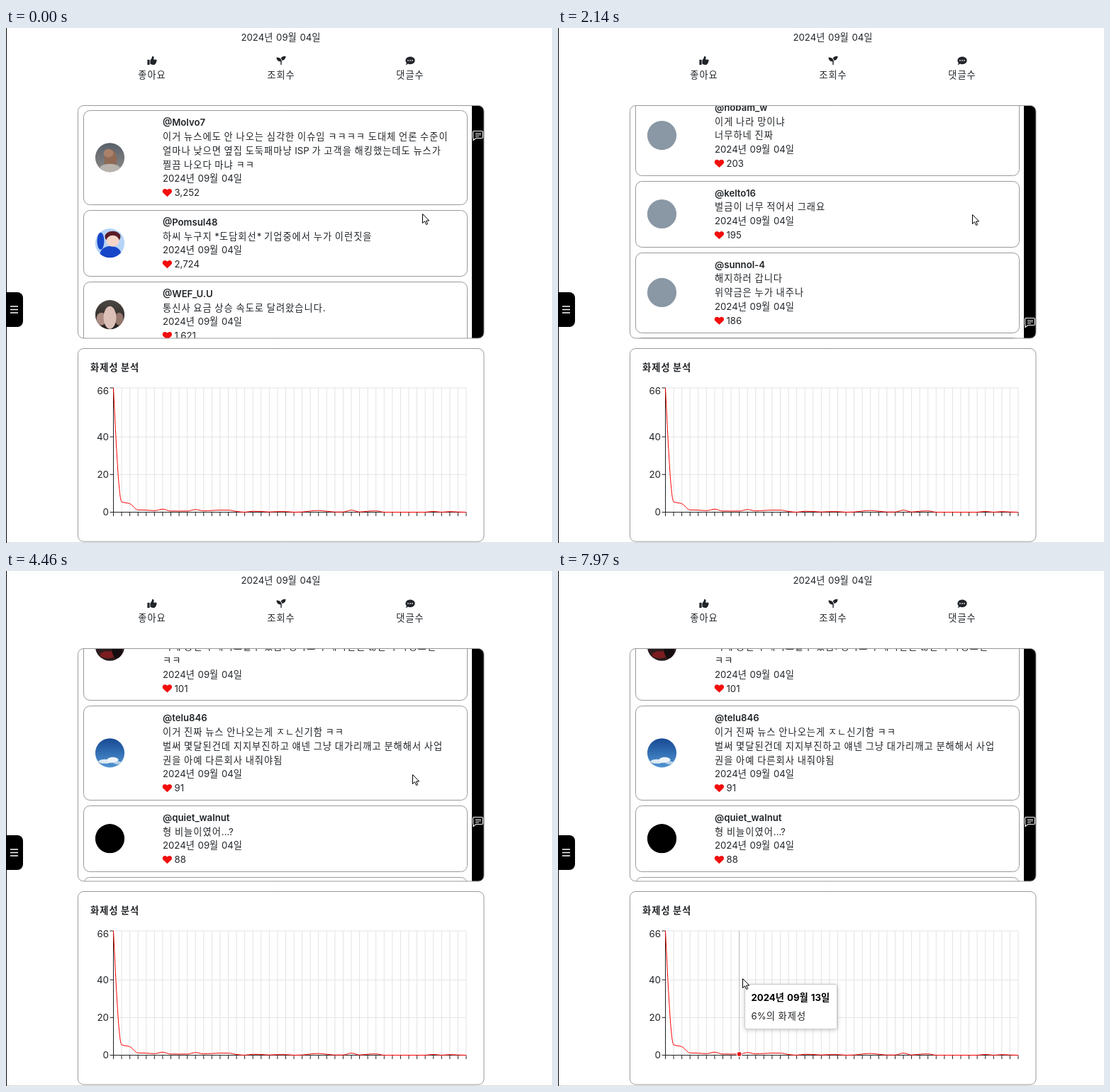
An HTML page with a canvas that plays this animation: 770 px wide and 727 px high, repeating every 8000 ms.

```html
<!DOCTYPE html>
<html lang="ko">
<head>
<meta charset="utf-8">
<title>댓글과 화제성 분석</title>
<style>
html, body { margin: 0; width: 100%; height: 100%; overflow: hidden; background: #fff; }
canvas { display: block; width: 770px; height: 727px; }
</style>
</head>
<body>
<canvas id="stage" width="770" height="727"></canvas>
<script>
const ctx = document.getElementById('stage').getContext('2d');
const LOOP = 8000, TICK = 70, INK = '#212529', EDGE = '#999';
const LINE = 19.83, PAD = 14.7, GAP = 7;
const VIEW = { top: 109, height: 329 };
const DATE = '2024년 09월 04일';

// Each comment: name, likes, avatar, lines of text.
// Avatar: background (one colour or two for a gradient), letter, blobs of [colour, x, y, rx, ry].
const plain = { bg: ['#8a97a5'] };
const comments = [
  ['@Molvo7', '3,252', { bg: ['#59616a', '#8b8886'], blobs: [['#8f6a55', 1, 3, 9, 14], ['#b9b3ae', 0, 15, 14, 6], ['#a98069', -2, -6, 7, 6]] },
    '이거 뉴스에도 안 나오는 심각한 이슈임 ㅋㅋㅋㅋ 도대체 언론 수준이', '얼마나 낮으면 옆집 도둑패마냥 ISP 가 고객을 해킹했는데도 뉴스가', '찔끔 나오다 마냐 ㅋㅋ'],
  ['@Pomsul48', '2,724', { bg: ['#b5d3f7'], blobs: [['#1747c8', 1, 16, 15, 12], ['#1747c8', -13, -3, 5, 12], ['#5a1c28', 4, -9, 11, 8], ['#f6d6c8', 4, -3, 9, 8]] },
    '하씨 누구지 *도담회선* 기업중에서 누가 이런짓을'],
  ['@WEF_U.U', '1,621', { bg: ['#4a4642', '#25211f'], blobs: [['#ae8d84', -12, 6, 7, 9], ['#96776e', 13, 6, 6, 9], ['#dbc0b7', 0, 4, 9, 16]] },
    '통신사 요금 상승 속도로 달려왔습니다.'],
  ['@sorim30', '1,498', plain, '이런 영상은 더 많은 사람들이 봐야 합니다', '설명이 정말 쉽네요'],
  ['@bulto_k', '1,204', plain, '보안에 돈을 안 쓰니까 이런 일이 생기지', '매번 똑같은 사과문'],
  ['@nanol55', '987', plain, '이걸 이제서야 알았네요'],
  ['@perun-q', '842', plain, '요금은 매년 올리면서', '고객 보호는 뒷전이네'],
  ['@dalsik09', '711', { bg: ['#2f86e8'], blobs: [['#050505', 0, 5, 14, 22]] },
    '통신사가 이러면 안되지', '요금은 제일 비싸게 받으면서', '고객은 뒷전이고', '사과도 없이 넘어가고', '그돈으로 보안만 챙겼어도 이지경까지안왔음( 구석이나 코인거래소', '보면 보안완벽한곳은 안털림)', '정부가 나서서 소비자보호해줄때임'],
  ['@TubbNoory', '475', { bg: ['#fff'], blobs: [['#c9c9c9', 0, 17, 13, 8], ['#242424', 0, -7, 10, 10], ['#c9987c', 0, -1, 8, 10]] },
    '3:37 노벤 어디 달려있는거얔ㅋㅋㅋㅋ'],
  ['@qqv-k7e', '429', { bg: ['#01579b'], letter: 'Q' },
    '3:59 힘으로 안되는 게 있다면 힘이 부족한 게 아닌지 다시 생각해 보', '아요'],
  ['@mirae_v', '402', plain, '회사가 커도 보안은 작네', '다들 조심하세요'],
  ['@torok81', '366', plain, '인터넷이 느린 이유가 있었네', '속도 측정 해봐야겠다', '어쩐지 밤마다 끊기더라'],
  ['@fennu-2', '331', plain, '정리 감사합니다', '다음 영상도 기대됩니다'],
  ['@rollin7', '299', { bg: ['#eee6df'], blobs: [['#d9a27c', -8, 8, 8, 9], ['#efe9e4', 5, 3, 8, 9], ['#c23b2d', 0, 14, 10, 4]] }, '댓글이 더 재밌네'],
  ['@plomder', '255', { bg: ['#7b1fa2'], letter: '나' },
    '모래섬 초대받아서 노을다락방 라이브 보고싶은 새벽자판이면 개추', 'ㅋㅋ'],
  ['@marshlight7056', '233', { bg: ['#0d0a0a'], blobs: [['#b98358', 0, -5, 10, 11], ['#e2c198', 0, 8, 10, 10], ['#d8ab7a', -5, -12, 4, 4]] },
    'vo마루빛결도 토렌트 받을 때 70KB/s도 안나오던데.. 10.0.0.1만 켜도', '10MB/s 정도로 확 높아짐...이거 조사해야함 ㄹㅇ'],
  ['@guest-ovrixwn', '214', plain, '한국 통신3사가 "대한민국"의 요약본인 그냥ㅡㅡㅡ', '답이 없다'],
  ['@hobam_w', '203', plain, '이게 나라 망이냐', '너무하네 진짜'],
  ['@kelto16', '195', plain, '벌금이 너무 적어서 그래요'],
  ['@sunnol-4', '186', plain, '해지하러 갑니다', '위약금은 누가 내주나'],
  ['@ksrttmz8237', '160', { bg: ['#c64f52'], blobs: [['#a93f43', 0, 16, 15, 10], ['#c64f52', 0, 18, 15, 10]] },
    '1:31 새벽자판은 솔방울콩과 두리 방송을 즐겨본다'],
  ['@hww-da3ol', '156', { bg: ['#5d4037'], letter: 'h' },
    '새벽자판님 아무리 조회수가 급해도 그렇지', '국가 기반산업인 통신을 업으로 삼는 기업이', '이런 짓을 할 리가 없지 않읍니까!', '예?! 이게 진짜면 통신사가 스팸메신저 보내라고', '개인정보 팔아넘긴 괴담도 진짜겠네! 허 참나!'],
  ['@나무결소리봄', '148', plain, '뉴스에 안 나오는 이유가 있겠지', '광고주니까'],
  ['@vando_3', '139', plain, '파일 하나 받는데 하루 걸림', '이제 이해가 되네'],
  ['@oritae5', '131', plain, '소송 가면 이길 수 있나요', '궁금합니다'],
  ['@limpo-x', '122', plain, '요즘 세상에 이런 일이', '믿기지가 않네요'],
  ['@ssudam', '117', plain, '영상 잘 봤습니다', '공유할게요'],
  ['@gorae_n', '109', plain, '빨리 조사해라', '기다리고 있다'],
  ['@dokkom2', '101', { bg: ['#2c1d1f'], blobs: [['#7c1c1e', -3, 12, 11, 5], ['#140c0e', 10, 5, 7, 12]] },
    '전화해서 물어보니 모른다고 함', '상담원도 처음 듣는다는데', '되레 통신사 해지도할수 있음! 생각보다 해지인원 많은거 다행스런', 'ㅋㅋ'],
  ['@telu846', '91', { bg: ['#174a94', '#4f94d2'], blobs: [['#dfe9f3', -7, 12, 9, 3], ['#eef4fa', 4, 10, 8, 4], ['#b9d2ea', 12, 14, 7, 2]] },
    '이거 진짜 뉴스 안나오는게 ㅈㄴ신기함 ㅋㅋ', '벌써 몇달된건데 지지부진하고 얘넨 그냥 대가리깨고 분해해서 사업', '권을 아예 다른회사 내줘야됨'],
  ['@quiet_walnut', '88', { bg: ['#000'] }, '형 비늘이였어...?'],
  ['@numal70', '85', plain, '잘 보고 갑니다']
].map(([name, likes, avatar, ...lines]) =>
  ({ name, likes, avatar, lines, h: (lines.length + 3) * LINE + PAD }));

let total = 0;
for (const c of comments) { c.top = total; total += c.h + GAP; }

// Scroll that puts comment i at height y, and page height that puts the thumb at iconY.
const at = (i, y) => comments[i].top + 116 - y;
const fit = (s, iconY) => (s + VIEW.height / 2) * VIEW.height / (iconY - VIEW.top);
const sA = at(8, 212.5), sB = at(14, 162), sC = at(20, 133), sD = at(29, 190);
const pages = [[0, fit(sA, 393)], [865, fit(sB, 358)], [2200, fit(sC, 335)], [3500, fit(sD, 353.5)]];

const linear = k => k;
const easeIn = k => k * k;
const easeOut = k => 1 - (1 - k) ** 2;
const easeBoth = k => k * k * (3 - 2 * k);

// Keys: time, value, easing of the way to that value.
const scrollKeys = [
  [0, 0], [760, sA, easeBoth], [830, sA + 3], [1110, sA + 430, easeBoth],
  [1390, sA + 430], [1600, sB, easeIn], [2140, pages[1][1] - VIEW.height, easeOut],
  [2200, pages[1][1] - VIEW.height], [2480, sC - 40, easeBoth], [2610, sC - 40], [2680, sC],
  [2820, sC + 280, easeOut], [2900, sC + 280], [3180, sC + 880, easeBoth],
  [3510, sC + 880], [3930, sD, easeBoth]
];
const mouseKeys = [
  [60, [587.5, 262]], [690, [584.5, 263.5]], [4390, [584.5, 263.5]], [4460, [573.5, 287.5]],
  [4810, [490, 515]], [5090, [390, 570]], [5240, [174, 572]], [5450, [171, 568]],
  [5590, [160, 572]], [5660, [159.5, 580]], [6010, [159, 577]], [6080, [147.5, 574]],
  [6220, [147.5, 576]], [6290, [160, 576]], [6920, [163, 574]], [6990, [171, 572]],
  [7340, [192, 570]], [7760, [252, 573]], [7970, [260.5, 575]]
];

// The screen moves in short held steps, counted from each key.
function track(keys, t) {
  const n = keys.findIndex(k => k[0] > t);
  if (n === 0) return keys[0][1];
  if (n < 0) return keys[keys.length - 1][1];
  const [t0, a] = keys[n - 1], [t1, b, ease = linear] = keys[n];
  const k = ease(Math.floor((t - t0) / TICK) * TICK / (t1 - t0));
  return Array.isArray(a) ? a.map((v, i) => v + (b[i] - v) * k) : a + (b - a) * k;
}

// Hangul takes a full em per syllable.
function text(s, x, y, { size = 13.2, weight = 400, color = INK, align = 0 } = {}) {
  const use = r => { ctx.font = r.font; ctx.letterSpacing = r.gap; };
  const runs = s.split(/([ㄱ-ㆎ가-힣]+)/).filter(Boolean).map(part => {
    const hangul = /[ㄱ-ㆎ가-힣]/.test(part);
    const family = hangul ? '"Noto Sans CJK KR", "Noto Sans CJK", sans-serif' : 'Inter, sans-serif';
    const r = { part, font: `${weight} ${size}px ${family}`, gap: hangul ? `${size * .08}px` : '0px' };
    use(r);
    r.w = ctx.measureText(part).width;
    return r;
  });
  const width = runs.reduce((sum, r) => sum + r.w, 0);
  x -= width * align;
  ctx.fillStyle = color;
  for (const r of runs) {
    use(r);
    ctx.fillText(r.part, x, Math.round(y + size * .36));
    x += r.w;
  }
  return width;
}

function line(x0, y0, x1, y1, color, w = 1) {
  ctx.strokeStyle = color;
  ctx.lineWidth = w;
  ctx.beginPath();
  ctx.moveTo(x0, y0);
  ctx.lineTo(x1, y1);
  ctx.stroke();
}

function box(x, y, w, h, r, { fill, stroke } = {}) {
  ctx.beginPath();
  ctx.roundRect(x, y, w, h, r);
  if (fill) { ctx.fillStyle = fill; ctx.fill(); }
  if (stroke) { ctx.strokeStyle = stroke; ctx.lineWidth = 1; ctx.stroke(); }
}

function ellipse(x, y, rx, ry, color) {
  ctx.fillStyle = color;
  ctx.beginPath();
  ctx.ellipse(x, y, rx, ry, 0, 0, 7);
  ctx.fill();
}

function shape(path, x, y, { fill, stroke, width = 1 } = {}) {
  ctx.save();
  ctx.translate(x, y);
  if (fill) { ctx.fillStyle = fill; ctx.fill(path); }
  if (stroke) { ctx.strokeStyle = stroke; ctx.lineWidth = width; ctx.stroke(path); }
  ctx.restore();
}

const thumb = new Path2D('M-6.6-1.2h2.6q.6 0 .6.6V5.4q0 .6-.6.6h-2.6zM-2.6-.8C-1-2-.2-3.6 0-5.4Q.2-6.4 1.2-6.2Q3-5.6 2.6-3.4L2-1.4H5.4Q6.8-1.2 6.6.2Q6.6 1 6 1.4Q6.4 2.8 5.2 3.4Q5.4 4.6 4.2 5Q4 6 2.6 6H1Q-.8 6-2.6 4.6Z');
const sprout = new Path2D('M-6.6-4.6H-5Q-.2-4.4.7.6V5.4Q.7 6.2 0 6.2T-.7 5.4V1.6Q-6.4 1-6.6-4.6ZM6.6-6.2Q6.4-.6 1.4 0Q1-1.8-.4-3.2Q1.4-6.2 5-6.2Z');
const speech = new Path2D('M0-5.6C4-5.6 6.7-3.2 6.7-.2S4 5.2 0 5.2Q-1.6 5.2-3 4.6Q-4.6 6-6.6 6Q-5.2 4.6-5.2 3.2C-8.4-.4-5.6-5.6 0-5.6Z');
const heart = new Path2D('M0 5.7L-5.8.4C-7.4-1.2-6.8-5.4-3.2-5.4Q-1.3-5.4 0-3.9Q1.3-5.4 3.2-5.4C6.8-5.4 7.4-1.2 5.8.4Z');
const bubble = new Path2D('M-5.5-6H5.5Q7-6 7-4.5V2.5Q7 4 5.5 4H-2.5L-6.5 7V4Q-7 4-7 2.5V-4.5Q-7-6-5.5-6Z');
const arrow = new Path2D('M0 0V13L3 10.2L5.2 15L7.2 14.1L5.1 9.5H9.2Z');

function drawAvatar({ bg, letter, blobs = [] }, x, y) {
  ctx.save();
  ctx.beginPath();
  ctx.arc(x, y, 20.6, 0, 7);
  ctx.clip();
  const fill = ctx.createLinearGradient(0, y - 20, 0, y + 20);
  fill.addColorStop(0, bg[0]);
  fill.addColorStop(1, bg[bg.length - 1]);
  ctx.fillStyle = fill;
  ctx.fillRect(x - 21, y - 21, 42, 42);
  for (const [color, dx, dy, rx, ry] of blobs) ellipse(x + dx, y + dy, rx, ry, color);
  ctx.restore();
  if (letter) text(letter, x, y, { size: 19, weight: 600, color: '#fff', align: .5 });
}

function drawComment(c, y) {
  box(109.5, Math.round(y) + .5, 541, Math.round(c.h) - 1, 9, { stroke: EDGE });
  drawAvatar(c.avatar, 146.5, y + c.h / 2);
  const row = i => y + 17.3 + i * LINE;
  text(c.name, 221, row(0), { weight: 600 });
  c.lines.forEach((s, i) => {
    const stamp = (s.match(/^\d:\d\d/) || [''])[0];
    const w = stamp ? text(stamp, 221, row(i + 1), { color: '#1a73d9' }) : 0;
    text(s.slice(stamp.length), 221 + w, row(i + 1));
  });
  const n = c.lines.length + 1;
  text(DATE, 221, row(n));
  shape(heart, 227.4, row(n + 1), { fill: '#f20d0d' });
  text(c.likes, 237.5, row(n + 1));
}

function drawList(t) {
  const s = track(scrollKeys, t);
  ctx.save();
  ctx.beginPath();
  ctx.roundRect(101.5, 109.5, 572.5, 328.5, 8);
  ctx.clip();
  for (const c of comments) {
    const y = 116 + c.top - s;
    if (y < 440 && y + c.h > 108) drawComment(c, y);
  }
  ctx.fillStyle = '#000';
  ctx.fillRect(657, 109, 17, 330);
  const page = pages.filter(p => p[0] <= t).pop()[1];
  const y = Math.round(VIEW.top + VIEW.height * (s + VIEW.height / 2) / page);
  shape(bubble, 665.5, y - .5, { stroke: '#fff', width: 1.1 });
  [-3, -.8, 1.4].forEach((dy, i) => line(662, y + dy - .3, i < 2 ? 670 : 667, y + dy - .3, '#fff', .9));
  ctx.restore();
  box(101.5, 109.5, 572.5, 328.5, 8, { stroke: EDGE });
}

const plot = { x0: 151.5, x1: 649, y0: 508, y1: 683.5 };
const values = [66, 5.5, 4.5, 1.2, 1.1, .8, 1.6, .6, .6, .6, 1.4, .7, .9, 1.1, 1.1, .4, 0, .5, .4, .1, .3, .3,
  0, .1, .6, .9, .5, .1, .1, 1.1, .1, .5, .7, 0, 0, 0, 0, 0, 0, .4, 0, .3, .1, 0];
const step = (plot.x1 - plot.x0) / (values.length - 1);
const px = i => plot.x0 + i * step;
const py = v => plot.y1 - v / 66 * (plot.y1 - plot.y0);

// Monotone cubic through the values.
function curvePath() {
  const last = values.length - 1;
  const d = i => py(values[i + 1]) - py(values[i]);
  const m = values.map((_, i) => {
    if (i === 0 || i === last) return null;
    const a = d(i - 1), b = d(i);
    return (Math.sign(a) + Math.sign(b)) * Math.min(Math.abs(a), Math.abs(b), Math.abs(a + b) / 4);
  });
  m[0] = (3 * d(0) - m[1]) / 2;
  m[last] = (3 * d(last - 1) - m[last - 1]) / 2;
  const path = new Path2D();
  path.moveTo(px(0), py(values[0]));
  for (let i = 0; i < last; i++) {
    const y0 = py(values[i]), y1 = py(values[i + 1]);
    path.bezierCurveTo(px(i) + step / 3, y0 + m[i] / 3, px(i + 1) - step / 3, y1 - m[i + 1] / 3, px(i + 1), y1);
  }
  return path;
}
const curve = curvePath();

function activeIndex([x, y]) {
  const inside = x >= plot.x0 && x <= plot.x1 && y >= plot.y0 && y <= plot.y1;
  return inside ? Math.round((x - plot.x0) / step) : -1;
}

// The tooltip trails the pointer and is seen once per tick.
function tipPlace(t) {
  const k = 1 - Math.exp(-.1), phase = 60;
  const seen = Math.floor((t - phase) / TICK) * TICK + phase;
  let p = null;
  for (let u = 4460; u <= Math.max(seen, 4810); u += 10) {
    const m = track(mouseKeys, u), i = activeIndex(m);
    if (i < 0) continue;
    const goal = [px(i) + 9.5, m[1] + 9.5];
    p = p ? p.map((v, j) => v + (goal[j] - v) * k) : goal;
  }
  return p;
}

function drawTip(t, i) {
  const p = tipPlace(t);
  if (!p) return;
  const [x, y] = p.map(v => Math.round(v) + .5);
  const label = `2024년 09월 ${String(4 + i).padStart(2, '0')}일`;
  const bold = { weight: 700, color: '#000' };
  const w = Math.round(text(label, -999, 0, bold) + 18);
  ctx.save();
  ctx.shadowColor = 'rgba(0,0,0,.25)';
  ctx.shadowBlur = 6;
  ctx.shadowOffsetY = 1;
  box(x, y, w, 63, 3, { fill: '#fff' });
  ctx.restore();
  box(x, y, w, 63, 3, { stroke: '#ccc' });
  text(label, x + 9, y + 18.5, bold);
  text(`${Math.round(values[i] * 10)}%의 화제성`, x + 9, y + 45);
}

function drawChart(t) {
  box(101.5, 452.5, 572.5, 272.5, 8, { stroke: EDGE });
  text('화제성 분석', 119, 479, { weight: 600 });
  for (let i = 0; i < values.length; i++) line(px(i), plot.y0, px(i), plot.y1, '#e3e3e3');
  for (const v of [66, 40, 20]) line(plot.x0, py(v), plot.x1, py(v), '#e3e3e3');
  const i = activeIndex(track(mouseKeys, t));
  if (i >= 0) line(px(i), plot.y0, px(i), plot.y1, '#bbb');
  const axis = '#222';
  line(plot.x0, plot.y0, plot.x0, plot.y1, axis);
  line(plot.x0, plot.y1, plot.x1, plot.y1, axis);
  for (let n = 0; n < values.length; n++) line(px(n), plot.y1, px(n), 689, axis);
  for (const v of [66, 40, 20, 0]) {
    line(146.5, py(v), plot.x0, py(v), axis);
    text(String(v), 145, v === 66 ? 512 : py(v), { align: 1, size: 13.4 });
  }
  shape(curve, 0, 0, { stroke: '#f00', width: 1 });
  if (i < 0) return;
  ellipse(px(i), py(values[i]), 4, 4, '#fff');
  ellipse(px(i), py(values[i]), 2.9, 2.9, '#e8171b');
  drawTip(t, i);
}

function drawHead() {
  const mid = { align: .5 };
  text(DATE, 388, 13, mid);
  shape(thumb, 206, 46, { fill: INK });
  shape(sprout, 388, 46, { fill: INK });
  shape(speech, 570, 46, { fill: INK });
  for (const dx of [-3, 0, 3]) ellipse(570 + dx, 45.8, .9, .9, '#fff');
  text('좋아요', 206, 66, mid);
  text('조회수', 388, 66, mid);
  text('댓글수', 570, 66, mid);
  line(0, 726.5, 770, 726.5, '#ddd');
  ctx.fillStyle = '#000';
  ctx.fillRect(0, 0, 1, 727);
  box(0, 373, 24, 49, [0, 8, 8, 0], { fill: '#000' });
  for (const y of [393, 397.5, 402]) line(6, y, 17, y, '#fff', 1.5);
}

function draw() {
  const t = performance.now() % LOOP;
  ctx.fillStyle = '#fff';
  ctx.fillRect(0, 0, 770, 727);
  drawHead();
  drawList(t);
  drawChart(t);
  const [x, y] = track(mouseKeys, t);
  shape(arrow, Math.floor(x) + .5, Math.floor(y) + .5, { fill: '#fff', stroke: '#000' });
  requestAnimationFrame(draw);
}
draw();
</script>
</body>
</html>
```
